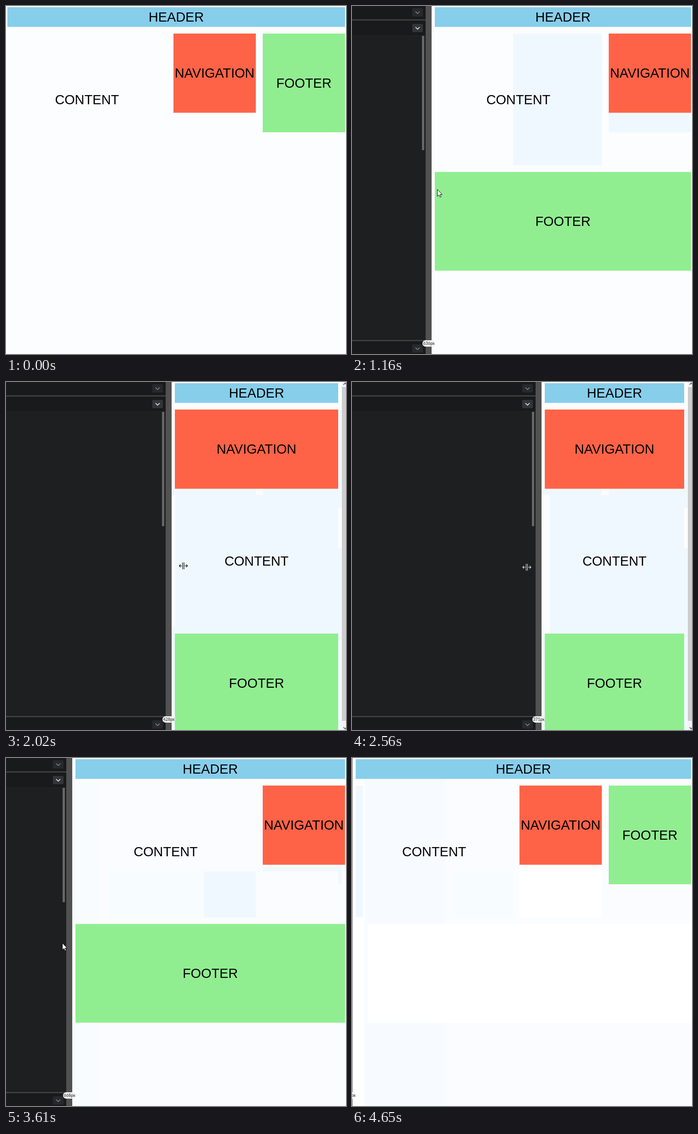
Recreate the animation shown at these times as an HTML page. Size 739 px wide and 758 px high, loop 4.92 s.

```html
<!DOCTYPE html>
<html lang="en">
<head>
<meta charset="utf-8">
<title>Responsive grid</title>
<style>
  html, body { margin: 0; width: 100%; height: 100%; overflow: hidden; background: #fcfdff; }
  svg { display: block; }
  .title { font: 28.8px "Liberation Sans", Arial, sans-serif; text-anchor: middle; }
  .size { font: 9px Lato, sans-serif; text-anchor: middle; fill: #222; }
</style>
</head>
<body>
<svg id="stage" width="739" height="758" viewBox="0 0 739 758"></svg>
<script>
const LOOP = 4920;
const ICE = '#f0f8ff', PALE = '#f7fbff', WHITE = '#fff';
const stage = document.getElementById('stage');

// Drag runs: first change, last change, number of changes, first and last pane edge
const RUNS = [
  [0, 0, 1, -4, -4],
  [400, 530, 4, 3, 35],
  [630, 860, 8, 45, 121],
  [930, 1160, 5, 130, 173],
  [1225, 1420, 4, 189, 237],
  [1470, 1980, 8, 251, 339],
  [2020, 2020, 1, 360, 360],
  [2120, 2310, 6, 372, 422],
  [2520, 3000, 12, 412, 307],
  [3050, 3560, 14, 297, 166],
  [3610, 4120, 13, 144, 43],
  [4150, 4650, 11, 39, 1]
];

function paneEdge(t) {
  const [start, end, count, from, to] = RUNS.filter(run => t + 0.5 >= run[0]).pop();
  if (count === 1) return from;
  const last = count - 1;
  const step = Math.min(last, Math.floor((t + 0.5 - start) / (end - start) * last));
  return Math.round(from + (to - from) * step / last);
}

const rect = (x, y, w, h, fill, extra = '') =>
  `<rect x="${x}" y="${y}" width="${Math.max(0, w)}" height="${h}" fill="${fill}" ${extra}/>`;

const line = (d, stroke, width) =>
  `<path d="${d}" fill="none" stroke="${stroke}" stroke-width="${width}"/>`;

const title = (text, x, y) => `<text class="title" x="${x}" y="${y + 10}">${text}</text>`;

function box(text, left, right, top, height, fill) {
  return rect(left, top, right - left, height, fill) +
    title(text, (left + right) / 2, top + height / 2);
}

// Faint tints that stay behind while the layout is dragged
function backdrop(mode, edge, back) {
  if (mode === 'wide') {
    if (!back) return rect(0, 0, 739, 758, '#fcfdff');
    return rect(0, 0, 739, 758, '#fbfcff') + rect(0, 0, 27, 758, WHITE) +
      rect(27, 46, 177, 712, PALE) + rect(223, 247, 126, 100, '#f6fcff') +
      rect(edge + 7, 60, 24 - edge - 7, 287, ICE) +
      rect(34, 361, 705, 216, WHITE) + rect(364, 233, 179, 114, WHITE);
  }
  if (mode === 'medium') {
    if (!back) {
      return rect(0, 0, 739, 758, '#fcfdff') + rect(350, 60, 193, 287, ICE) +
        rect(558, 232, 179, 43, ICE) + rect(36, 60, 6, 287, ICE);
    }
    return rect(0, 0, 739, 758, '#fbfcff') + rect(edge, 46, 204 - edge, 712, '#f9fcff') +
      rect(223, 247, 197, 100, '#f7fcff') + rect(430, 247, 113, 100, ICE) +
      rect(558, 237, 172, 10, ICE) + rect(722, 247, 8, 28, ICE);
  }
  return rect(0, 0, 739, 758, ICE) + rect(0, 0, 730, 60, '#fcfdff') +
    (back ? rect(edge, 246, 430 - edge, 302, '#f8fcff') + rect(423, 246, 7, 287, '#fcfdff') : '') +
    rect(edge, 60, 7, 172, '#fcfdff') + rect(edge, 246, 7, 287, '#fcfdff') +
    rect(543, 232, 15, 14, '#fcfdff') + rect(722, 275, 8, 86, '#fcfdff');
}

function page(mode, edge) {
  const left = edge + 7, narrow = mode === 'narrow', wide = mode === 'wide';
  const right = narrow ? 722 : 737;
  const [navLeft, navRight] = narrow ? [left, right] : wide ? [364, 543] : [558, 737];
  const contentRight = narrow ? right : wide ? 349 : 543;
  const footerTop = narrow ? 548 : wide ? 60 : 361.5;
  return box('HEADER', left, right, 2.5, 43, '#87ceeb') +
    title('CONTENT', (left + contentRight) / 2, narrow ? 390 : 203.5) +
    box('NAVIGATION', navLeft, navRight, 60, 172.5, '#ff6347') +
    box('FOOTER', wide ? 558 : left, right, footerTop, 215, '#90ee90') +
    (narrow ? scrollbar() : '');
}

function scrollbar() {
  return rect(730, 0, 9, 758, '#f1f3f5') + rect(730, 11, 9, 727, '#cdcdcd') +
    line('M733.5 6l3.5-3.5l3.5 3.5M733.5 752l3.5 3.5l3.5-3.5', '#505050', 1.6);
}

function editor(edge) {
  const side = edge - 13;
  const button = (y, fill, stroke) => rect(side - 29, y - 9, 23, 18, fill, 'rx="2"') +
    line(`M${side - 22} ${y - 2}l4.5 4.5l4.5-4.5`, stroke, 1.5);
  return rect(0, 0, side, 758, '#1e1f21') + rect(0, 0, side, 64, '#191a1c') +
    rect(0, 29, side, 2.5, '#444546') + rect(0, 64, side, 1, '#252628') +
    rect(0, 730, side, 28, '#191a1c') + rect(0, 727.5, side, 2.5, '#444546') +
    rect(side - 8, 65, 5, 249, '#666766') +
    button(14, '#28292c', '#8b8c8e') + button(48, '#343538', '#fff') +
    button(746, '#28292c', '#8b8c8e') + rect(side, 0, 13, 758, '#515151');
}

function sizeLabel(edge) {
  const x = edge - 6;
  return rect(x - 14, 728, 28, 14, '#f1f1f1', 'rx="7"') +
    `<text class="size" x="${x}" y="738">${Math.round((745.5 - edge) / 0.9)}px</text>`;
}

function pointer(t, edge) {
  if (t >= 2020 && t < 3050) {
    const x = edge + (t < 2120 ? 25.5 : t < 2520 ? 12 : -32);
    const y = t < 2520 ? 400.5 : 403.5;
    const shape = `M${x - 1.5} ${y - 7.5}v15M${x + 1.5} ${y - 7.5}v15` +
      `M${x - 3} ${y}h-6m3-3l-3 3l3 3M${x + 3} ${y}h6m-3-3l3 3l-3 3`;
    return x < edge - 13 ? line(shape, '#e8e8e8', 1.1)
      : line(shape, '#fff', 2.6) + line(shape, '#000', 1.2);
  }
  const x = edge + (t < 2020 ? 12 : -22);
  const y = t < 930 ? 397 : t < 2020 ? 399.5 : 403;
  return `<path d="M${x + .5} ${y}v15l3.5-3.2l2.4 5.2l2.4-1l-2.3-5h4.5z" fill="#fff" stroke="#000"/>`;
}

function draw(t) {
  const edge = paneEdge(t);
  const mode = edge < 25.5 ? 'wide' : edge < 205.5 ? 'medium' : 'narrow';
  stage.innerHTML = backdrop(mode, edge, t >= 2520) + page(mode, edge) + editor(edge) +
    (t >= 400 ? sizeLabel(edge) + pointer(t, edge) : '');
}

const begin = performance.now();
function tick() {
  draw((performance.now() - begin) % LOOP);
  requestAnimationFrame(tick);
}
tick();
</script>
</body>
</html>
```
